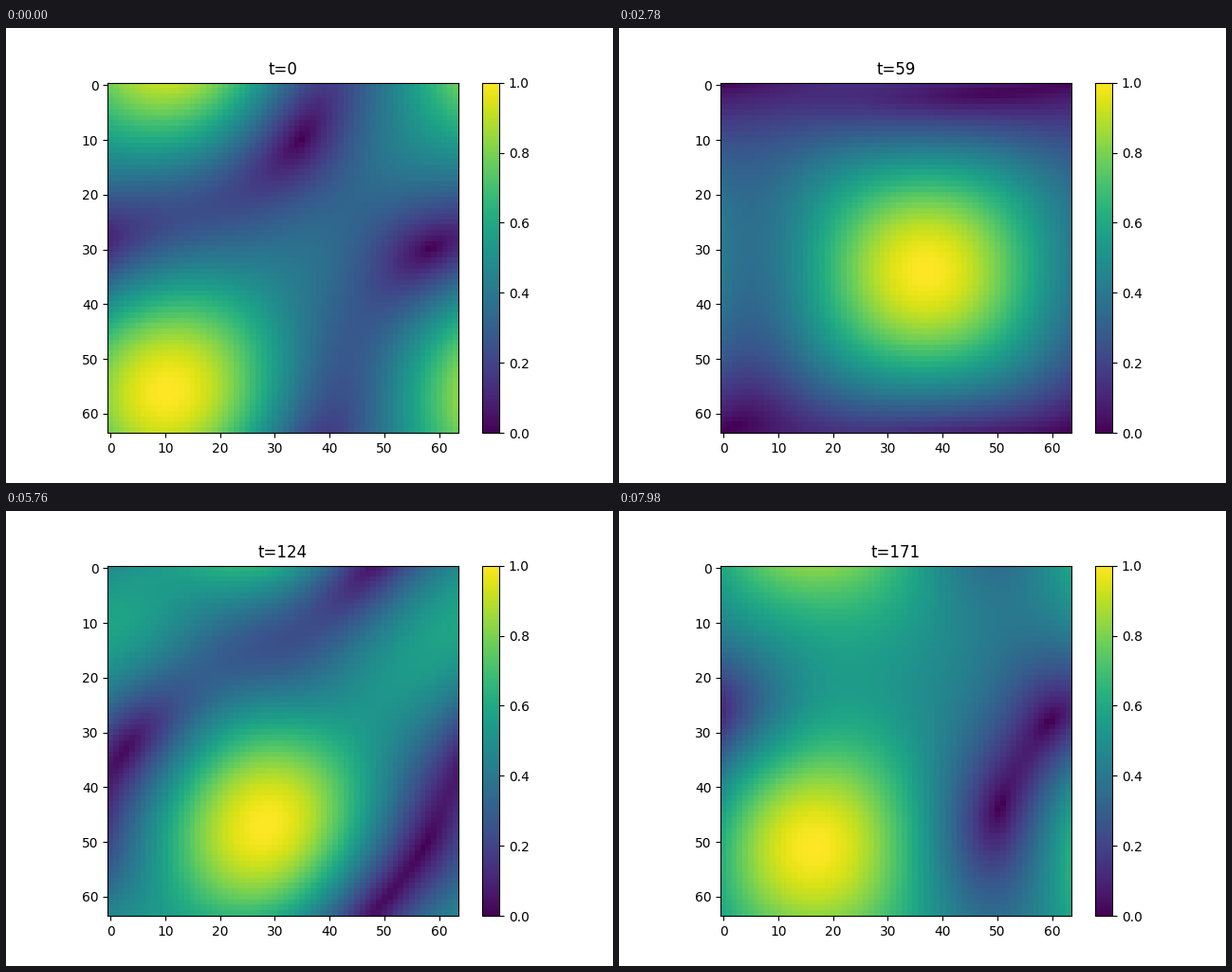
A matplotlib script for the animation above (8000 ms loop, 640 by 480 pixels).

```python
import numpy as np
import matplotlib.pyplot as plt
from matplotlib.animation import FuncAnimation

N = 64
STEP = 20          # ms per animation frame
FRAMES = 400

# Key points at each time, on a plane that wraps every N cells.
TIMES = np.array([0, 30, 59, 89, 109, 140, 171], float)
CREST = [(10.5, 56), (39, 31), (37, 34), (35, 35), (38.5, 35), (15.5, 59.5), (16.5, 51)]
NODE_A = [(34.7, 10), (24.8, 3), (50, 1.5), (25.5, 0.3), (46, 2), (49.5, -11), (50.5, -20.5)]
NODE_B = [(-5.5, 29.8), (0, 47.5), (2, 62.5), (9.5, 53), (6, 37), (-1.2, 33.3), (-4.5, 28)]
# Amplitude half a period from the crest: to the right, below, and both
FAR = [(.25, .23, .33), (.36, .25, .40), (.36, .07, .09), (.25, .07, .34),
       (.05, .22, .66), (.10, .28, .38), (.15, .52, .38)]

KEYS = np.hstack([CREST, NODE_A, NODE_B, FAR])
SLOPES = np.gradient(KEYS, TIMES, axis=0)

# Low wave numbers, one of each opposite pair
MODES = np.array([(i, j) for i in range(-2, 3) for j in range(-2, 3) if (i, j) >= (0, 0)])
ROUGHNESS = np.tile(0.3 + (MODES ** 2).sum(axis=1), 2)
RIDGE = np.diag((0.03 * ROUGHNESS) ** 2)


def values(points):
    phase = 2 * np.pi / N * np.asarray(points, float) @ MODES.T
    return np.concatenate([np.cos(phase), np.sin(phase)], axis=-1)


def slopes(point):
    """Rows giving the x and y slope of the intensity at one point."""
    cos, sin = np.split(values(point), 2)
    return np.hstack([-MODES.T * sin, MODES.T * cos])


ROWS, COLS = np.mgrid[:N, :N]
BASIS = values(np.stack([COLS, ROWS], axis=-1))
COARSE = BASIS[::4, ::4].reshape(-1, BASIS.shape[-1])


def keys_at(t):
    """Smooth path through the key points."""
    i = min(np.searchsorted(TIMES, t, side="right"), len(TIMES) - 1) - 1
    h = TIMES[i + 1] - TIMES[i]
    s = (t - TIMES[i]) / h
    return ((1 + 2 * s) * (1 - s) ** 2 * KEYS[i] + s * (1 - s) ** 2 * h * SLOPES[i]
            + s * s * (3 - 2 * s) * KEYS[i + 1] + s * s * (s - 1) * h * SLOPES[i + 1])


def field(t):
    """Smoothest intensity with the given crest, nodes and far levels."""
    crest, node_a, node_b, far = np.split(keys_at(t), [2, 4, 6])
    half = N / 2
    spots = [crest, node_a, node_b,
             crest + (half, 0), crest + (0, half), crest + (half, half)]
    rows = np.vstack([values(spots)] + [slopes(p) for p in spots[:3]])
    goal = np.concatenate([[1, 0, 0], np.maximum(far, 0) ** 2, np.zeros(6)])
    square, side = rows.T @ rows + RIDGE, rows.T @ goal
    c = np.linalg.solve(square, side)
    for _ in range(4):      # push negative areas back up to zero
        below = COARSE[COARSE @ c < 0]
        square = square + below.T @ below
        c = np.linalg.solve(square, side)
    p = BASIS @ c
    return np.sqrt((p - p.min()) / (p.max() - p.min()))


def tick(n):
    """Counter value: every three counts are held for 20, 100 and 20 ms."""
    turn, part = divmod(n, 7)
    return 3 * turn + (part > 0) + (part > 5)


fig, ax = plt.subplots(figsize=(6.4, 4.8), dpi=100)
image = ax.imshow(field(0), cmap="viridis", vmin=0, vmax=1)
fig.colorbar(image)
title = ax.set_title("t=0")


def draw(n):
    t = tick(n)
    image.set_data(field(t))
    title.set_text(f"t={t}")
    return image, title


anim = FuncAnimation(fig, draw, frames=FRAMES, interval=STEP, repeat=True,
                     repeat_delay=0, cache_frame_data=False)
plt.show()
```
